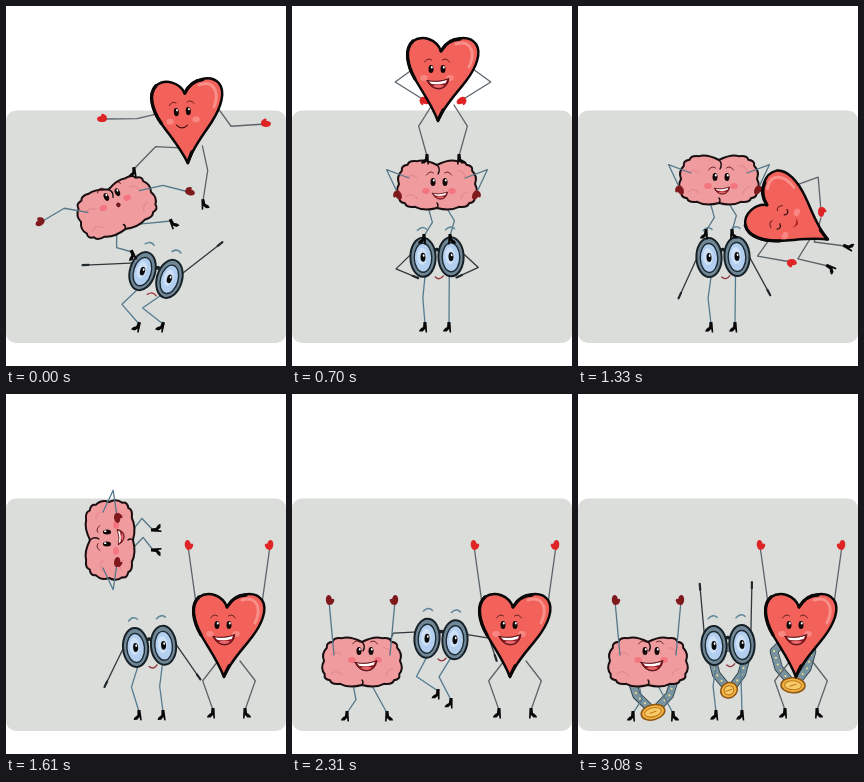
An HTML page with a canvas that plays this animation: 280 by 360 pixels, repeating every 3150 ms.

```html
<!DOCTYPE html>
<html lang="en">
<head>
<meta charset="utf-8">
<title>Balancing trio</title>
<style>
html, body { margin: 0; width: 100%; height: 100%; overflow: hidden; background: #fff; }
canvas { display: block; width: 280px; height: 360px; }
</style>
</head>
<body>
<canvas id="stage"></canvas>
<script>
const LOOP = 3150, STEP = 70, RAD = Math.PI / 180;
const canvas = document.getElementById('stage');
const g = canvas.getContext('2d');
const dpr = window.devicePixelRatio || 1;
canvas.width = 280 * dpr;
canvas.height = 360 * dpr;

const lerp = (a, b, u) => a + (b - a) * u;
const mix = (a, b, u) => a.map((n, i) => lerp(n, b[i], u));
const soft = u => u * u * (3 - 2 * u);
const OUT = [1, -1];

function rotate(x, y, deg) {
  const c = Math.cos(deg * RAD), s = Math.sin(deg * RAD);
  return [x * c - y * s, x * s + y * c];
}

// A mirrored pair beside the body, or a pair of stage points
const spread = (x, y, tilt = 0) => () => [...rotate(-x, y, tilt), ...rotate(x, y, tilt)];
const points = (ax, ay, bx, by) => (x, y, turn) =>
  [...rotate(ax - x, ay - y, -turn), ...rotate(bx - x, by - y, -turn)];

function makePose(who, p) {
  const [x, y, turn] = p.body;
  return {
    body: p.body, hands: p.hands(x, y, turn), feet: p.feet(x, y, turn),
    elbows: p.elbows || OUT, knees: p.knees || who.knees, face: p.face || who.face
  };
}

// Bones are upper and lower lengths; a key is time, pose, mood and jump height
const heart = {
  shoulder: [30, -8], hip: [11, 28], arm: [22, 34], leg: [25, 31], knees: OUT, face: [-6, -8],
  poses: {
    wobble: { body: [183, 113, -5], hands: points(97, 113, 259, 118), feet: points(128, 163, 197, 195), elbows: [-1, 1] },
    sway: { body: [159, 64, 13], hands: points(75, 44, 221, 106), feet: points(129, 132, 165, 140) },
    proud: { body: [151, 71, 0], hands: spread(19, 23), feet: spread(16, 79) },
    dive: { body: [213, 209, -63], hands: points(213, 256, 243, 205), feet: points(250, 260, 267, 240), knees: [1, 1], face: [-8, -5] },
    cheer: { body: [223, 239, 0], hands: spread(41, -87), feet: spread(16, 77) }
  },
  keys: [[0, 'wobble', 'smile'], [280, 'sway', 'open'], [560, 'proud', 'open', 12],
    [840, 'proud', 'open'], [1330, 'dive', 'sleep', 90], [1610, 'cheer', 'open', 8]]
};
const brain = {
  shoulder: [28, -6], hip: [9, 23], arm: [24, 27], leg: [16, 16], knees: [-1, -1], face: [2, -2],
  poses: {
    wobble: { body: [110, 201, -23], hands: points(35, 216, 183, 186), feet: points(126, 246, 165, 215), knees: [1, -1], face: [1, -13] },
    sway: { body: [124, 172, -4], hands: points(47, 187, 200, 159), feet: points(113, 212, 149, 217) },
    proud: { body: [145, 178, 0], hands: spread(39, 10), feet: spread(13, 52) },
    stand: { body: [141, 173, 0], hands: spread(39, 10), feet: spread(13, 52) },
    flip: { body: [65, 169, -180], hands: spread(7, 6), feet: spread(7, 36) },
    cheer: { body: [70, 267, -360], hands: spread(33, -60), feet: points(55, 319, 95, 319), face: [3, -10] }
  },
  keys: [[0, 'wobble', 'oh'], [280, 'sway', 'oh'], [560, 'proud', 'grin', 12], [840, 'proud', 'grin'],
    [1120, 'stand', 'grin'], [1400, 'stand', 'grin'], [1820, 'flip', 'grin', 25],
    [2030, 'cheer', 'open'], [2240, 'cheer', 'open', 8]]
};
const planted = points(133, 318, 157, 318);
const glasses = {
  shoulder: [23, -6], hip: [12, 16], arm: [25, 22], leg: [25, 26], knees: [1, 1], face: [0, 0],
  poses: {
    wobble: { body: [150, 269, 16], hands: spread(69, -21, -25), feet: planted },
    sway: { body: [144, 254, -11], hands: points(81, 263, 206, 238), feet: points(140, 304, 164, 301) },
    proud: { body: [145, 251, -1], hands: spread(21, 20), feet: planted },
    stand: { body: [145, 251, -2], hands: spread(45, 38), feet: planted },
    lean: { body: [141, 255, -9], hands: spread(51, 30), feet: planted },
    hop: { body: [149, 245, 3], hands: spread(56, 17), feet: points(146, 297, 159, 306) },
    raise: { body: [150, 251, -2], hands: spread(26, -60), feet: points(138, 318, 164, 318) }
  },
  keys: [[0, 'wobble', 'sad'], [280, 'sway', 'sad'], [560, 'proud', 'smile'], [840, 'proud', 'smile'],
    [1120, 'stand', 'smile'], [1470, 'stand', 'smile'], [1820, 'lean', 'smile'], [2030, 'lean', 'smile'],
    [2310, 'hop', 'smile'], [2590, 'lean', 'smile'], [2800, 'raise', 'smile']]
};
for (const who of [heart, brain, glasses])
  for (const name in who.poses) who.poses[name] = makePose(who, who.poses[name]);

// Elbow or knee from both ends and the bone lengths
function joint([ax, ay], [bx, by], [upper, lower], bend) {
  const dx = bx - ax, dy = by - ay, d = Math.hypot(dx, dy) || 1;
  const reach = upper + lower;
  const along = d >= reach ? d * upper / reach : (upper ** 2 - lower ** 2 + d * d) / (2 * d);
  const side = d >= reach ? 0 : bend * Math.sqrt(Math.max(0, upper ** 2 - along ** 2));
  return [ax + (dx * along - dy * side) / d, ay + (dy * along + dx * side) / d];
}

function poseAt(who, t) {
  const k = who.keys;
  let i = 0;
  while (i < k.length - 1 && t >= k[i + 1][0]) i++;
  const a = k[i], b = k[Math.min(i + 1, k.length - 1)];
  const lift = b[3] || 0;
  const u = a === b ? 0 : (t - a[0]) / (b[0] - a[0]);
  const e = lift > 20 ? u : soft(u);
  const v = {};
  for (const part in who.poses[a[1]]) v[part] = mix(who.poses[a[1]][part], who.poses[b[1]][part], e);
  const [x, y0, turn] = v.body;
  const y = y0 - lift * Math.sin(Math.PI * u);
  const place = (px, py) => {
    const [dx, dy] = rotate(px, py, turn);
    return [x + dx, y + dy];
  };
  const limbs = ([rx, ry], ends, bones, bends) => [0, 1].map(n => {
    const root = place(n ? rx : -rx, ry), end = place(ends[2 * n], ends[2 * n + 1]);
    return [root, joint(root, end, bones, bends[n]), end];
  });
  return {
    x, y, turn: turn * RAD, face: v.face, mood: (u < 0.5 ? a : b)[2],
    arms: limbs(who.shoulder, v.hands, who.arm, v.elbows),
    legs: limbs(who.hip, v.feet, who.leg, v.knees)
  };
}

function at(x, y, turn, draw, scale = 1) {
  g.save();
  g.translate(x, y);
  g.rotate(turn);
  g.scale(scale, scale);
  draw();
  g.restore();
}
function line(color, width, d) {
  g.strokeStyle = color;
  g.lineWidth = width;
  g.stroke(new Path2D(d));
}
function fill(color, d) {
  g.fillStyle = color;
  g.fill(new Path2D(d));
}
function oval(x, y, rx, ry, color, edge, width = 1, tilt = 0) {
  g.beginPath();
  g.ellipse(x, y, rx, ry, tilt, 0, 7);
  if (color) { g.fillStyle = color; g.fill(); }
  if (edge) { g.strokeStyle = edge; g.lineWidth = width; g.stroke(); }
}
const path = pts => 'M' + pts.map(p => p.join(' ')).join('L');

function drawLegs(p, color, toes) {
  p.legs.forEach((leg, i) => {
    line(color, 1.3, path(leg));
    at(...leg[2], p.turn, () => {
      g.scale(toes[i], 1);
      fill('#080808', 'M-1.5 -2L1.5 -2L2 3Q6 5 6 7.5L2.5 7.5L0 5L-.5 8.5L-2 8.5Z');
    });
  });
}
function drawArms(p, color, hand) {
  p.arms.forEach((arm, i) => {
    line(color, 1.3, path(arm));
    const [, a, b] = arm;
    at(...b, Math.atan2(b[1] - a[1], b[0] - a[0]), () => {
      if (!hand) return line('#222a2e', 2.2, 'M-4 0L2 0');
      oval(1, 0, 5, 3.1, hand);
      oval(-1, i ? -3 : 3, 3.2, 1.6, hand, null, 0, i ? -0.6 : 0.6);
    });
  });
}

function drawMouth(mood) {
  const ink = '#4b1014';
  if (mood === 'smile') return line(ink, 1.3, 'M-8 0Q-3 6 3 1');
  if (mood === 'oh') return oval(1, -1, 1.7, 2, '#8d1520', ink, 0.8);
  if (mood === 'sleep') return fill('#b3262c', 'M-4 -1Q1 2 6 -2Q3 6 -4 -1Z');
  at(0, -2, -0.04, () => {
    const lips = 'M-11 0Q0 3 11 -1Q9 9 0 9Q-8 8 -11 0Z';
    fill('#8c1720', lips);
    fill('#e8676b', 'M-6 6Q0 3 6 6Q1 10 -6 6Z');
    fill('#fff', 'M-9 .7Q0 3 9 .1L7.5 3.2Q0 5 -7 3.4Z');
    line(ink, 0.9, lips);
  }, mood === 'grin' ? 0.7 : 1);
}
function drawFace([x, y], mood, blush) {
  at(x, y, 0, () => {
    for (const s of [-1, 1]) {
      oval(s * 13, 9, 3.8, 3, blush);
      if (mood === 'sleep') {
        line('#2a0c0c', 1.2, `M${s * 8 - 3} -1Q${s * 8} 3 ${s * 8 + 3} -1`);
      } else {
        oval(s * 6, 0, 2.5, 4.1, '#120808');
        oval(s * 6 + 0.8, -1.8, 0.9, 1.2, '#fff');
      }
      line('#5a1a1a', 0.9, `M${s * 9 - 3.5} ${-8 - s}Q${s * 9} -12 ${s * 9 + 3.5} ${-8 + s}`);
    }
    at(1, 13, 0, () => drawMouth(mood));
  });
}

const heartShape = 'M-2 -26C-6 -37 -20 -43 -30 -36C-39 -28 -36 -12 -28 2C-20 16 -11 28 -5 44' +
  'C0 30 14 16 23 4C33 -9 39 -24 33 -33C25 -43 7 -40 -2 -26Z';

function drawHeart(p) {
  drawLegs(p, '#5f6365', [-1, 1]);
  drawArms(p, '#5b646a', '#df2426');
  at(p.x, p.y, p.turn, () => {
    fill('#f2625b', heartShape);
    line('#f88f88', 3, 'M13 -33Q26 -37 29 -25Q30 -18 26 -10');
    line('#090707', 2.5, heartShape);
    line('#090707', 3.3, 'M-30 -36C-39 -28 -36 -12 -28 2M-2 -26Q5 -38 17 -38M0 33L-5 43');
    drawFace(p.face, p.mood, '#f98681');
  });
}

// Boxy ring of lobes with a dent at the top
const LOBES = 16;
const root = n => Math.sign(n) * Math.abs(n) ** 0.62;
const lobe = i => {
  const a = (i / LOBES) * 2 * Math.PI - Math.PI / 2;
  const y = 24 * root(Math.sin(a));
  return [(38 + y / 12) * root(Math.cos(a)), i % LOBES ? y : y + 5];
};
let brainShape = 'M' + lobe(0);
for (let i = 0; i < LOBES; i++) {
  const a = lobe(i), b = lobe(i + 1);
  const mx = (a[0] + b[0]) / 2, my = (a[1] + b[1]) / 2, bulge = 1 + 4.5 / Math.hypot(mx, my);
  brainShape += `Q${mx * bulge} ${my * bulge} ${b}`;
}

function drawBrain(p) {
  drawLegs(p, '#557789', [-1, 1]);
  at(p.x, p.y, p.turn, () => {
    fill('#f09c9f', brainShape);
    line('#e38b90', 1.2, 'M-31 -6Q-25 -11 -20 -6M-31 13Q-25 8 -20 14M20 -13Q27 -14 28 -7M31 8Q25 8 24 15');
    line('#190e10', 2, brainShape);
    line('#190e10', 1.4, 'M0 -19Q4 -15 1 -10M0 24Q2 21 0 19');
    drawFace(p.face, p.mood, '#f27580');
  });
  drawArms(p, '#557789', '#7f191c');
}

function drawGlasses(p) {
  drawLegs(p, '#557b90', [-1, -1]);
  drawArms(p, '#30383c');
  at(p.x, p.y, p.turn, () => {
    line('#1b2226', 3.5, 'M-3 -6Q0 -9 3 -6');
    for (const s of [-1, 1]) {
      const x = s * 14;
      oval(x, 0, 12.6, 19.5, '#6f8796', '#172026', 2);
      oval(x, 0.5, 8.8, 14.5, '#b3cff0', '#1d2a32', 1.4);
      oval(x - 1, -1, 4.8, 8.5, '#cfe1f6');
      oval(x, 0, 2.5, 4.4, '#080a0c');
      oval(x + 0.7, -1.8, 0.9, 1.3, '#fff');
      line('#5f8799', 1.5, `M${x - 5} -27Q${x} -32 ${x + 4} -28`);
    }
    const sad = p.mood === 'sad';
    line(sad ? '#a03a3f' : '#8e3036', 1.3, sad ? 'M-3 21Q1 16 6 20' : 'M-2 20Q2 24 6 19');
  });
}

// Falls in, overshoots and settles
function medalDrop(t) {
  const s = (t - 2590) / 490;
  return -140 * Math.exp(-5 * s) * Math.cos(7 * s);
}
function drawMedal(t, x, y, w, h, r, tilt) {
  if (t < 2590) return;
  at(x, y + medalDrop(t), 0, () => {
    const band = `M-3 -4L${-w * 0.75} ${-h * 0.5}L${-w} ${-h}Q0 ${-h - 22} ${w} ${-h}L${w * 0.75} ${-h * 0.5}L4 -4`;
    line('#283942', 8.6, band);
    line('#7893a0', 7, band);
    g.setLineDash([0, 7]);
    line('#e7d98c', 2.2, band);
    g.setLineDash([]);
    oval(0, 0, r, 7.5, '#f3b542', '#8f5514', 1.5, tilt);
    oval(0, 0, r - 3.5, 4.5, '#f8cb67', '#bd7a20', 1.1, tilt);
    line('#bd7a20', 1.1, 'M-3 1L3 -1');
  });
}

function render(t) {
  g.setTransform(dpr, 0, 0, dpr, 0, 0);
  g.lineCap = g.lineJoin = 'round';
  g.fillStyle = '#fff';
  g.fillRect(0, 0, 280, 360);
  g.fillStyle = '#dadddA';
  g.beginPath();
  g.roundRect(0, 104.5, 280, 232.5, 10);
  g.fill();
  drawMedal(t, 151, 297, 17, 32, 8.5, -0.5);
  drawGlasses(poseAt(glasses, t));
  drawMedal(t, 75, 319, 22, 34, 12, -0.25);
  drawBrain(poseAt(brain, t));
  drawMedal(t, 215, 292, 19, 34, 12, 0.05);
  drawHeart(poseAt(heart, t));
}

const start = performance.now();
function tick() {
  const t = (performance.now() - start) % LOOP;
  render(Math.floor(t / STEP) * STEP);
  requestAnimationFrame(tick);
}
tick();
</script>
</body>
</html>
```
